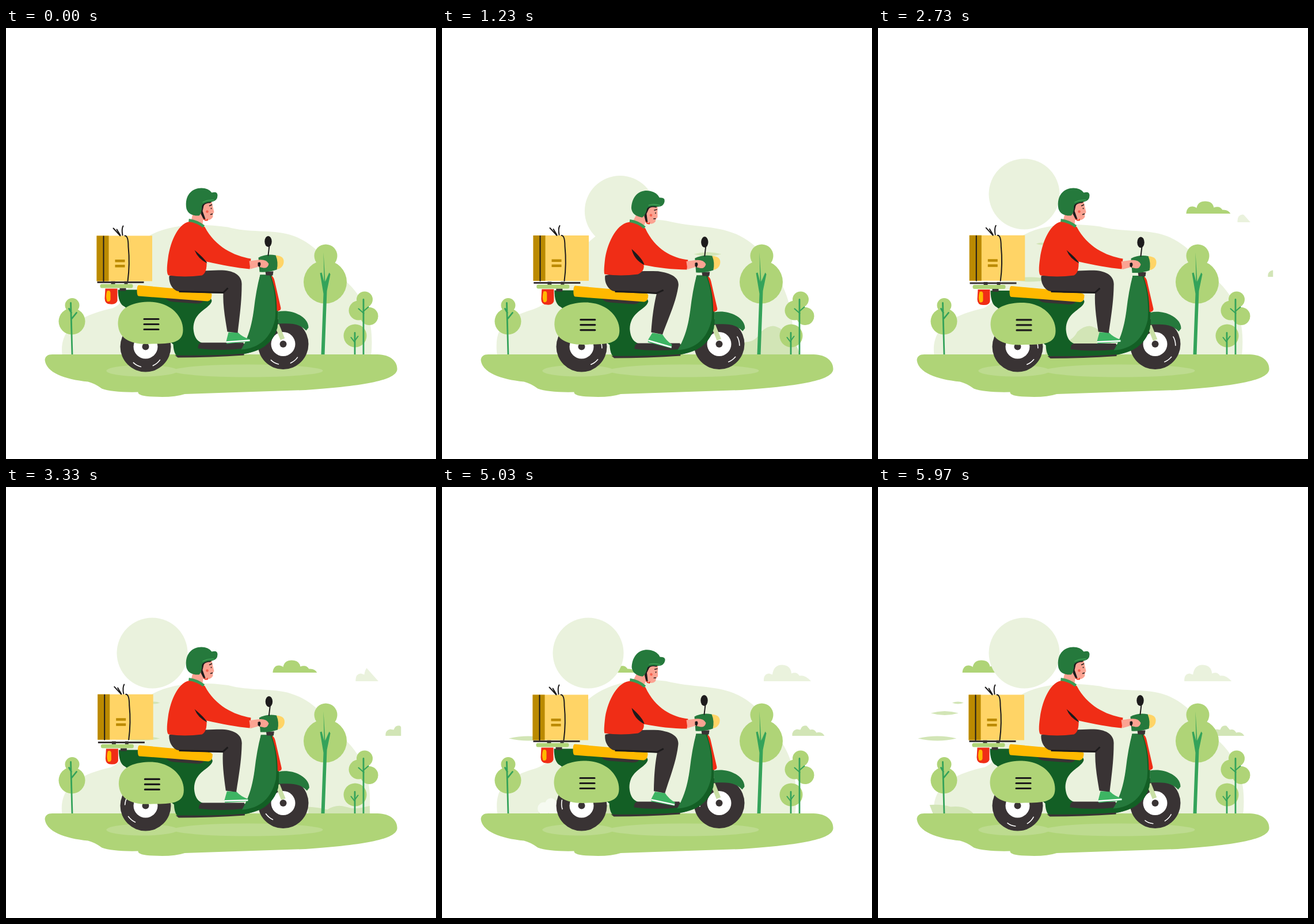
Animation, 747 px wide and 750 px high, one loop 6010 ms. Source, as an HTML page:

```html
<!DOCTYPE html>
<html lang="en">
<head>
<meta charset="utf-8">
<title>Scooter delivery</title>
<style>
html, body { margin: 0; width: 100%; height: 100%; overflow: hidden; background: #fff; }
svg { display: block; width: 100vw; height: 100vh; }
.lime { fill: #afd477; }
.pale { fill: #eaf2dd; }
.mist { fill: #d2e5b6; }
.deep { fill: #135f25; }
.green { fill: #25793c; }
.dark { fill: #393334; }
.red { fill: #f02d16; }
.skin { fill: #fba392; }
.gold { fill: #ffd466; }
.ochre { fill: #bb8a00; }
.trunk { fill: none; stroke: #34a35a; stroke-linecap: round; }
.ink { fill: none; stroke: #1d1b1c; stroke-linecap: round; }
</style>
</head>
<body>
<svg viewBox="-.5 -.5 747 750">
  <defs>
    <clipPath id="sky"><path d="M0 0H350L622 310L646 337L686 413V568H0Z"/></clipPath>
    <clipPath id="horizon"><path d="M85 480H606Q632 520 632 568H95L85 542Z"/></clipPath>
    <g id="wheel">
      <circle class="dark" r="44"/>
      <circle r="21" fill="#fff"/>
      <circle class="dark" r="6"/>
    </g>
    <path id="shine" fill="none" stroke="#fff" stroke-width="1.6" stroke-linecap="round"
      d="M-21 28Q-16 33-8 35M13 33Q21 29 25 23"/>
  </defs>

  <g clip-path="url(#sky)">
    <path id="cloud1" class="lime" d="M0 322.500Q1 310 11 310Q17 311 18 313Q20 301 33 301Q46 301 48 312Q58 308 63 316Q73 315 77 322.500Z"/>
  </g>
  <path id="hill" class="pale"/>
  <circle id="sun" class="pale" r="61.500"/>
  <g clip-path="url(#sky)">
    <path id="cloud2" class="pale" d="M0 337.500Q-1 325 9 324L15 326Q17 309 32 309Q47 310 48 324Q57 320 62 328Q72 326 82 337.500Z"/>
    <path id="cloud3" class="mist" d="M0 432.500Q-1 423 8 421L14 422Q17 413 25 415L31 422Q38 420 42 427Q51 424 56 432.500Z"/>
  </g>
  <g clip-path="url(#horizon)" class="mist">
    <path id="ridge1" d="M-75 568L-72 542Q-58 549-45 546Q-28 545-19 528Q-8 518 2 518Q18 520 30 540Q42 544 48 568Z"/>
    <path id="ridge2" d="M0 568V556Q18 557 33 561Q48 551 65 556Q80 561 95 557Q130 548 155 556Q182 553 195 568Z"/>
  </g>
  <g class="mist">
    <path id="wind1" d="M-24 393Q0 386 24 393Q0 400-24 393Z"/>
    <path id="wind2" d="M-34 437Q0 429 33 437Q0 445-34 437Z"/>
    <path id="wind3" d="M-10 375Q0 371 10 375Q0 379-10 375Z"/>
  </g>
  <g id="puff" fill="#f6faf1">
    <circle cx="-7" cy="559" r="11"/><circle cx="5" cy="551" r="10"/><circle cx="12" cy="562" r="12"/>
  </g>

  <g class="lime">
    <circle cx="114" cy="510" r="23"/><circle cx="114.500" cy="482" r="12.500"/>
    <circle cx="554" cy="441.500" r="37.500"/><circle cx="555" cy="396" r="20"/>
    <circle cx="622.500" cy="472" r="14"/><circle cx="612" cy="491" r="17"/><circle cx="630.500" cy="501" r="15.500"/>
    <circle cx="606" cy="535" r="20"/>
  </g>
  <g class="trunk" stroke-width="2.800">
    <path d="M112 478L114.500 568M114 505L122 495M113 495L109 488"/>
    <path d="M620.500 472V568M605.500 530V568"/>
    <path stroke-width="2" d="M621 496L612 488M621 492L629 485M605 546L599 538M606 543L611 536"/>
  </g>
  <path fill="#34a35a" d="M551 390L554 441L561 425L563 428L557 457L553 568H547L551 462L545 426L548 425L552 441Z"/>

  <path class="lime" d="M80 567.500H645C669 568 680 581 679 594C677 612 626 622 520 629.500L310 636.500Q290 643 255 641Q228 640 229 633Q185 634 166 627Q154 618 142 615C101 611 69 599 67 577Q68 567.500 80 567.500Z"/>
  <g fill="#bddb8f"><ellipse cx="236" cy="596" rx="62" ry="10"/><ellipse cx="420" cy="596" rx="130" ry="11"/></g>

  <use href="#wheel" x="242" y="554"/>
  <use href="#wheel" x="481" y="549.500"/>
  <g transform="translate(242 554)"><use class="spin" href="#shine"/></g>
  <g transform="translate(481 549.5)"><use class="spin" href="#shine"/></g>

  <g id="scooter">
    <path d="M470 516L480 541" stroke="#c9dfa5" stroke-width="8"/>
    <path class="green" d="M472 493C495 488 525 501 525 521L521 526C506 511 490 514 472 514Z"/>
    <path class="deep" d="M194 455H350L357 474C355 488 325 492 325 522C326 540 334 548 348 549L436 549L432 560C420 571 370 570 302 572Q291 572 290 550L205 484Q194 479 194 455Z"/>
    <path class="dark" d="M338 547H412L414 557Q370 562 333 557Q333 549 338 547ZM277 469L342 474Q340 479 330 479L290 476Q279 475 277 469Z"/>
    <path class="dark" d="M293 569Q355 570 413 566V569Q355 573 298 573Z"/>
    <path class="lime" d="M194 514C194 484 222 476 250 476C285 477 307 500 307 525C307 548 285 549 255 549C217 552 195 541 194 514Z"/>
    <path class="ink" stroke-width="3.200" d="M239.500 506H264.500M239.500 515H264.500M239.500 524H264.500"/>
    <path fill="#ffb900" d="M230 447L340 457Q356 459 357 463Q357 474 350 475L230 466Q227 466 227 457Q227 447 230 447Z"/>
    <path class="red" d="M172 453H193V474Q191 481 181 480Q171 480 171 470Z"/>
    <path fill="#ffb900" d="M175 457Q181 455 181 461V472Q180 477 175 475Q172 467 175 457Z"/>
    <path class="dark" d="M182 440H189V448H182ZM205 440H211V448H205ZM197 452H208V457H197ZM158 440.500H239V443.500H158Z"/>
    <rect class="lime" x="163" y="445" width="57" height="7" rx="3"/>
    <path class="deep" d="M441 429H461C472 452 474 495 471 521C463 549 440 565 408 566Q412 556 424 530Z"/>
    <path class="green" d="M441 429H457C467 450 469 485 467 506C460 538 440 557 408 559C422 536 427 512 430 490Q434 455 441 429Z"/>
    <path class="red" d="M460 431Q464 431 466 439L477 487Q477 492 470 492C470 466 466 450 460 431Z"/>
    <path class="dark" d="M450 423H464L463 430H451Z"/>
    <path class="gold" d="M468 395Q483 396 482 407Q481 418 468 420Z"/>
    <path class="green" d="M438 399Q452 392 468 395Q473 407 470 420Q455 425 440 424Z"/>
    <path class="ink" stroke-width="2" d="M457 378L455 395"/>
    <ellipse cx="455" cy="371" rx="6.200" ry="9.500" fill="#1d1b1c"/>
  </g>

  <g id="box">
    <path class="gold" d="M157 361H253.500V440H157Z"/>
    <path class="ochre" d="M157 361H178V440H157Z"/>
    <path class="ochre" d="M189 402.500H206V407H189ZM189 411.500H206V416H189Z"/>
    <path class="ink" stroke-width="2" d="M169 362V440M206 361Q212 361 212 380Q215 410 211 440M186 348L198 361M203 344Q200 349 202 360M192 350L198 360"/>
  </g>

  <path id="shoe" fill="#3db463"/>
  <path id="sole" fill="none" stroke="#fff" stroke-width="2.500"/>
  <path id="leg" class="dark"/>
  <path id="fold" fill="none" stroke="#1d1b1c" stroke-width="3"/>
  <g id="head">
    <path class="skin" d="M326 315L341 300L357 302Q359 312 361 320Q358 323 359 328Q356 334 348 334L342 333L341 342Q330 341 321 335Z"/>
    <path d="M338 304L357 300L355 304Q345 304 343 309L341 318L346 332L343 333L338 323Z" fill="#1d1b1c"/>
    <path class="red" d="M342 330L347 334L350 331V335H345Z"/>
    <circle cx="349" cy="319" r="2.300" fill="#f5624f"/>
    <path class="ink" stroke-width="1.500" d="M353 309L357 307M356 313V314M355 324L358 323"/>
    <path class="green" d="M313 314C309 290 323 278 339 278Q351 278 357 286Q367 283 367 291Q367 300 357 302Q342 303 340 309Q340 321 335 326Q317 327 313 314Z"/>
    <path d="M341 303Q349 298 361 299" fill="none" stroke="#43a85b" stroke-width="1.300"/>
  </g>
  <path id="torso" class="red"/>
  <path id="crease" fill="#1d1b1c"/>
  <path id="collar" fill="none" stroke="#3a9b55" stroke-width="5"/>
  <g id="hand">
    <path class="skin" d="M422 405L437 403Q452 401 456 410Q454 418 447 417L438 415L424 419Z"/>
    <path d="M437 408Q442 405 442 411L440 416L437 413Z" fill="#1d1b1c"/>
  </g>
</svg>
<script>
const LOOP = 6010, TAU = 2 * Math.PI;
const $ = id => document.getElementById(id);
const move = (id, x, y = 0) => $(id).setAttribute('transform', `translate(${x} ${y})`);
const wave = (t, period) => (1 - Math.cos(TAU * t / period)) / 2;
const bump = (t, mid, half) => Math.abs(t - mid) < half ? Math.cos((t - mid) / half * Math.PI / 2) ** 2 : 0;

// Blends two paths that share the same commands.
function blend(a, b, k) {
  const ends = b.match(/\d+/g);
  let i = 0;
  return a.replace(/\d+/g, n => (+n + (ends[i++] - n) * k).toFixed(2));
}

const swayPaths = {
  hill: ['M97 568C92 520 130 499 185 487C225 470 210 400 250 360C285 341 335 339 385 346C420 356 460 350 492 359C540 373 562 414 592 442C626 474 639 514 634 568Z',
         'M95 568C89 520 108 505 150 491C215 473 220 402 257 371C290 340 340 327 390 334C440 346 475 342 512 358C550 376 571 405 588 443C604 475 611 520 605 568Z'],
  leg: ['M283 431C300 425 340 421 375 421C400 422 410 433 409 447C409 480 404 510 402 530L384 528C380 505 376 480 377 461C340 461 310 460 296 457C286 452 282 440 283 431Z',
        'M283 430C300 425 340 421 375 423C400 427 413 435 410 450C405 480 389 510 381 533L361 529C363 505 367 480 372 462C340 461 310 460 296 457C286 452 281 440 283 430Z'],
  fold: ['M300 458Q340 459 377 460L385 452', 'M300 458Q340 459 372 461L384 456'],
  shoe: ['M386 529L402 529Q411 538 423 541L423 545L383 549L382 545Z',
         'M363 530L381 533Q387 544 397 551L396 558L355 546L356 541Z'],
  sole: ['M382 546L423 543', 'M356 543L396 556']
};
const leanPaths = {
  torso: ['M322 336C300 336 285 370 281 400Q277 427 282 430Q310 434 340 430Q349 425 348 406C375 412 400 417 423 419L425 401C395 396 363 380 345 346Q335 336 322 336Z',
          'M328 337C305 337 288 370 283 400Q280 425 282 428Q310 432 340 428Q352 422 350 412C375 417 400 420 425 420L427 403C400 400 370 385 353 348Q340 338 328 337Z'],
  crease: ['M327 386Q333 401 349 409Q345 401 327 386Z', 'M329 384Q333 403 351 412Q349 402 329 384Z'],
  collar: ['M317 334Q332 336 343 345', 'M326 335Q341 337 352 347']
};
function pose(paths, k) {
  for (const id in paths) $(id).setAttribute('d', blend(...paths[id], k));
}

function draw(now) {
  const t = now % LOOP;
  const bob = 2.3 * wave(t, 1000);
  const lean = bump(t, 1100, 950) + bump(t, 4980, 950);

  // The sun climbs out from behind the hill, then rests.
  const s = Math.min(t, 1950), early = Math.max(0, 1 - s / 630);
  $('sun').setAttribute('cx', 253.5 + (1950 - s) * .077);
  $('sun').setAttribute('cy', 288.5 + (1950 - s) * .041 + 45 * early);

  move('cloud1', 463 - .12 * (t - 3330));
  move('cloud2', 607 - .0285 * (t - 3330));
  move('cloud3', 659 - .03 * (t - 3330));
  move('ridge1', 573 - .1387 * (t - 1230));
  move('ridge2', 525 - .21 * (t - 3330));
  [[550.6, .0729], [399, .0496], [407, .045]].forEach(([x, v], i) => {
    move('wind' + (i + 1), x - v * t);
    $('wind' + (i + 1)).style.opacity = Math.min(1, t / 1000);
  });

  const q = (t / 3000 + .42) % 1;
  move('puff', 206 - 230 * q);
  $('puff').style.opacity = Math.max(0, Math.min(1, q * 15, 2.3 - q * 13));

  document.querySelectorAll('.spin').forEach(e => e.setAttribute('transform', `rotate(${t * .24})`));
  move('scooter', .8 * bob, 1.1 * bob);
  move('box', bob, -.5 * bob);
  move('hand', 2 * lean, .5 * bob);
  $('head').setAttribute('transform', `translate(${11 * lean} ${2 * lean}) rotate(${13 * lean} 330 335)`);
  pose(swayPaths, wave(t, 3000));
  pose(leanPaths, lean);
}

const start = performance.now();
(function tick() {
  draw(performance.now() - start);
  requestAnimationFrame(tick);
})();
</script>
</body>
</html>
```
